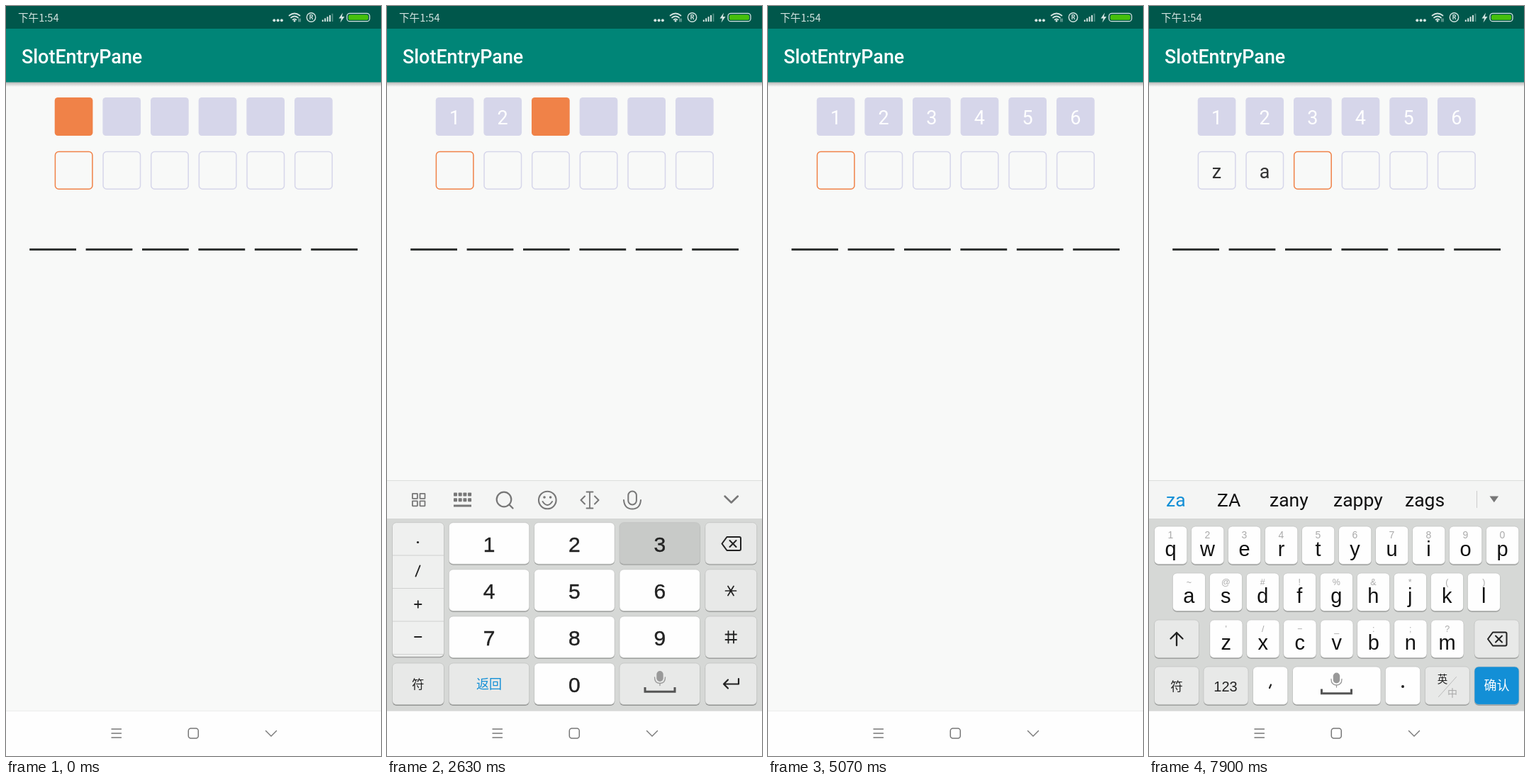
Write an HTML page that moves like this. It is 529 px wide and 1058 px high and loops after 8 s.

```html
<!DOCTYPE html>
<html lang="zh">
<head>
<meta charset="utf-8">
<style>
  html, body { margin: 0; width: 100%; height: 100%; overflow: hidden; background: #f8f9f8; }
  svg { display: block; width: 100vw; height: 100vh; }
  text { font-family: Roboto, sans-serif; }
  .key { font-family: "Liberation Sans", Arial, sans-serif; }
  .cjk { font-family: "Noto Sans CJK SC", "Noto Sans CJK", sans-serif; }
  .mid { text-anchor: middle; }
  .line { fill: none; stroke-linecap: round; stroke-linejoin: round; }
</style>
</head>
<body>
<svg id="stage" viewBox="0 0 529 1058"></svg>
<script>
const LOOP = 8000;
const ORANGE = '#f08248', LILAC = '#d6d6ea', INK = '#222', GREY = '#777', BLUE = '#138fd6';
const WHITE = '#fefefe', PALE = '#e8e9e8', PRESSED = '#c8cac8';

const rect = (x, y, w, h, fill, r = 0, more = '') =>
  `<rect x="${x}" y="${y}" width="${w}" height="${h}" rx="${r}" fill="${fill}" ${more}/>`;
const text = (s, x, y, size, fill, cls = 'mid', more = '') =>
  `<text x="${x}" y="${y}" font-size="${size}" fill="${fill}" class="${cls}" ${more}>${s}</text>`;
const line = (d, color = GREY, w = 2) =>
  `<path class="line" d="${d}" stroke="${color}" stroke-width="${w}"/>`;
const disc = (x, y, r, fill) => `<circle cx="${x}" cy="${y}" r="${r}" fill="${fill}"/>`;
const ring = (x, y, r, color, w) =>
  `<circle cx="${x}" cy="${y}" r="${r}" fill="none" stroke="${color}" stroke-width="${w}"/>`;
const group = (id, body) => `<g id="${id}">${body}</g>`;
const range = (n, f) => Array.from({ length: n }, (_, i) => f(i)).join('');

const key = (x, y, w, h, fill = WHITE, id = '') =>
  rect(x, y + 1.3, w, h, '#8e908e', 6) +
  rect(x, y, w, h, fill, 6, `stroke="#bfc1bf" stroke-width=".7" ${id && `id="${id}"`}`);

const eraser = (x, y) =>
  line(`M${x - 13} ${y}l7 -9.5h17.5q2 0 2 2v15q0 2 -2 2h-17.5z`, INK) +
  line(`M${x - 2} ${y - 4.5}l9 9m0 -9l-9 9`, INK);

const voice = (x, y) =>
  rect(x - 4.7, y - 15, 9.4, 15, '#999', 4.7) +
  line(`M${x - 7.5} ${y - 6}q0 8.5 7.5 8.5t7.5 -8.5m-7.5 8.5v3`, '#999', 1.3) +
  `<path d="M${x - 21} ${y + 8}v6.2h42v-6.2" fill="none" stroke="#555" stroke-width="3"/>`;

function statusBar() {
  const c = '#d5e4e1';
  return rect(0, 0, 529, 32, '#00574b') +
    text('下午1:54', 17, 22, 14.6, c, 'cjk') +
    range(3, i => disc(378.3 + 5.3 * i, 20.3, 2, c)) +
    line('M399.5 13.5q7.5 -6 15 0M402 16.5q5 -4 10 0M404.5 19.3q2.5 -2 5 0', c, 1.7) +
    disc(407, 21, 1.5, c) + line('M413 18v4m2 -4v4', c, .8) +
    ring(430.5, 16, 6.2, c, 1.4) +
    text('R', 430.5, 19.2, 9, c, 'mid', 'font-weight="700"') +
    range(5, i => rect(445.8 + 3.4 * i, 19.5 - 2.2 * i, 2, 2.5 + 2.2 * i, i < 4 ? c : '#4d8b81')) +
    `<path d="M475 9.5l-5.5 8h3.5l-1.5 6 6 -8.5h-3.6z" fill="${c}"/>` +
    rect(481, 10.3, 32, 11.4, 'none', 4, `stroke="${c}" stroke-width="1.3"`) +
    rect(483, 12.2, 28, 7.6, '#46c00c', 2.6);
}

function appBar() {
  return `<linearGradient id="shade" x2="0" y2="1">
      <stop stop-color="#000" stop-opacity=".28"/><stop offset="1" stop-color="#000" stop-opacity="0"/>
    </linearGradient>` +
    rect(0, 107, 529, 7, 'url(#shade)') + rect(0, 32, 529, 75.5, '#008577') +
    text('SlotEntryPane', 22, 81, 26.9, '#fff', '', 'font-weight="500"');
}

function fields() {
  return range(6, i => {
    const x = 68.7 + 67.65 * i;
    return rect(x, 129, 53.7, 54, LILAC, 4.5, `id="fill${i}"`) +
      text(i + 1, x + 26.8, 167, 27, '#fff', 'mid', `id="digit${i}"`) +
      rect(x + .7, 205.6, 52.5, 52.6, 'none', 5, `id="box${i}" stroke-width="1.5"`) +
      text('za'[i] || '', x + 26.8, 243, 27, '#333', 'mid', `id="char${i}"`) +
      rect(33.2 + 79.4 * i, 342, 65.8, 3, '#303332');
  });
}

function tools() {
  const y = 697;
  return range(4, i => rect(35.9 + 10.6 * (i % 2), 687.9 + 10.4 * (i >> 1), 7, 7, 'none', .5,
      `stroke="${GREY}" stroke-width="1.8"`)) +
    range(8, i => rect(94 + 6.7 * (i % 4), 686.5 + 7.7 * (i >> 2), 5, 5, GREY, .8)) +
    rect(94, 703.5, 25, 3, GREY) +
    ring(165, 696, 10.3, GREY, 2.2) + line('M172.5 703.5l5 5', GREY, 2.3) +
    ring(226.3, y, 12.3, GREY, 2.1) + disc(222, 693, 1.8, GREY) + disc(230.6, 693, 1.8, GREY) +
    line('M219.5 699q6.8 10 13.6 0') +
    line('M279 691.5l-5.5 5.5 5.5 5.5M293 691.5l5.5 5.5 -5.5 5.5') +
    line('M286 685.5v23M281.5 685.5h9M281.5 708.5h9', GREY, 1.8) +
    rect(340.3, 684.5, 11.6, 19, 'none', 5.8, `stroke="${GREY}" stroke-width="2"`) +
    line('M334 697q1 12.5 12 12.5t12 -12.5') +
    line('M476.5 691.5l9.2 9 9.2 -9', GREY, 2.5);
}

function candidates() {
  const xs = [24, 96, 170, 260, 361];
  return xs.map((x, i) => text('', x, 705.5, 26.5, i ? '#111' : BLUE, '', `id="word${i}"`)).join('') +
    rect(462, 684, 1, 24, '#ccc') + `<path d="M480.5 691.5h12.6l-6.3 8.7z" fill="${GREY}"/>`;
}

function numberPad() {
  const rowY = r => 728.7 + 66.1 * r, colX = c => 87.2 + 120.4 * c, W = 113.6, H = 58.6;
  const side = key(7.5, 728.7, 73, 189.3, '#eff0ef') +
    [774.5, 821, 867.5, 914].map(y => rect(8, y, 72, 1, '#d0d1d0')).join('') +
    disc(43.5, 756.5, 1.6, INK) + line('M46.5 789.5l-6 15', INK, 1.9) +
    line('M39 844h9.5m-4.75 -4.75v9.5M39 890h9.5', INK, 1.8) +
    rect(75, 735, 3, 46, '#ccc', 1.5, 'id="scrollbar"');
  const digits = range(10, i => {
    const d = (i + 1) % 10, x = colX(d ? i % 3 : 1), y = rowY(d ? Math.floor(i / 3) : 3);
    return key(x, y, W, H, WHITE, 'num' + d) + text(d, x + W / 2, y + 41.3, 30, INK, 'mid key', 'stroke="#222" stroke-width=".4"');
  });
  const right = range(4, r => key(448.8, rowY(r), 73, H, PALE));
  return side + digits + right +
    key(7.5, rowY(3), 73, H, PALE) + text('符', 43.7, 963, 17.5, INK, 'mid cjk') +
    key(colX(0), rowY(3), W, H, PALE) + text('返回', 144, 963, 18, BLUE, 'mid cjk') +
    key(colX(2), rowY(3), W, H, PALE) + voice(385, 953) +
    eraser(485.5, 758.5) +
    line('M477.5 825h15M481 818.5l8 13M489 818.5l-8 13', INK, 1.7) +
    line('M477.5 886.5h15.5M477.5 894h15.5M481.5 882v16.5M489 882v16.5', INK, 1.8) +
    line('M496 949v7.5h-21m6 -6l-6 6 6 6', INK, 2.2);
}

function letterPad() {
  const rows = [
    ['qwertyuiop', '1234567890', 7.5, 734],
    ['asdfghjkl', '~@#!%&*()', 33.3, 800],
    ['zxcvbnm', "'/−_:;?", 85.7, 866]
  ];
  const letters = rows.map(([chars, hints, x0, y]) => range(chars.length, i => {
    const x = x0 + 52 * i, hint = hints[i].replace('&', '&amp;');
    return key(x, y, 46.3, 53.4, WHITE, 'abc' + chars[i]) +
      text(hint, x + 23, y + 17, y < 800 ? 14 : 12.5, '#aaa', 'mid key') +
      text(chars[i], x + 23, y + 42, 29, '#111', 'mid key');
  })).join('');
  const wide = [[7.5, 866, 63], [459, 866, 63], [7.5, 932, 63], [77, 932, 63], [389.3, 932, 63]];
  return letters + wide.map(([x, y, w]) => key(x, y, w, 53.4, PALE)).join('') +
    key(146.5, 932, 49.3, 53.4) + key(202.5, 932, 124.5, 53.4) + key(333.3, 932, 49.5, 53.4) +
    key(459, 932, 63, 53.4, BLUE) +
    line('M39 902v-18m-8.5 8.5l8.5 -8.5 8.5 8.5', INK, 2.3) + eraser(491, 893) +
    text('符', 39, 965.5, 17.5, INK, 'mid cjk') + text('123', 108, 966.5, 20, INK, 'mid key') +
    line('M172 957.5l-2 4.5', INK, 2.2) + voice(264.5, 955.5) + disc(358, 960, 2, INK) +
    text('英', 414, 955, 14.5, INK, 'mid cjk') + text('中', 428, 973.5, 14, '#aaa', 'mid cjk') +
    line('M408.5 974.5l25 -28', '#bbb', 1) +
    text('', 490.5, 965, 18, '#fff', 'mid cjk', 'id="action"');
}

const stage = document.getElementById('stage');
stage.innerHTML =
  rect(0, 0, 529, 1058, '#f8f9f8') + appBar() + statusBar() + fields() +
  rect(0, 994, 529, 64, WHITE) +
  group('keyboard',
    rect(0, 669, 529, 54, '#f4f5f4') + rect(0, 669, 529, 1, '#dcdedc') +
    rect(0, 723, 529, 271.5, '#d6d8d6') + rect(0, 994.5, 529, 64, WHITE) +
    group('tools', tools()) + group('candidates', candidates()) +
    group('numbers', numberPad()) + group('letters', letterPad())) +
  rect(0, 994, 529, 1, 'rgba(0,0,0,.07)') +
  line('M149 1020h13.5m-13.5 6h13.5m-13.5 6h13.5', GREY, 1.4) +
  rect(257.3, 1019, 14, 14, 'none', 3.5, `stroke="${GREY}" stroke-width="1.5"`) +
  group('down', line('M366.5 1022.5l7.5 7.5 7.5 -7.5', GREY, 1.4)) +
  group('back', line('M379.5 1018.7l-7.3 7.3 7.3 7.3', GREY, 1.4));

const parts = {};
stage.querySelectorAll('[id]').forEach(e => parts[e.id] = e);
const show = (id, on) => parts[id].style.display = on ? '' : 'none';
const paint = (id, attr, value) => parts[id].setAttribute(attr, value);
const write = (id, s) => { if (parts[id].textContent !== s) parts[id].textContent = s; };
const last = (steps, t) => steps.filter(s => s[0] <= t).pop()[1];

// key, pressed from, released and entered at
const taps = [
  ['num1', 1720, 1820], ['num2', 2330, 2430], ['num3', 2630, 2740],
  ['num4', 2940, 3040], ['num5', 3240, 3340], ['num6', 3550, 3650],
  ['abcz', 7400, 7500], ['abca', 7700, 7800]
];
// keyboard drop in pixels, null while hidden
const drops = [
  [0, null], [100, 0], [3950, 30.5], [4050, 150], [4150, null],
  [5270, 180], [5370, 50], [5470, 8], [5570, 0]
];
const words = [[], ['z', 'Z', 'zip', 'zone', 'zero'], ['za', 'ZA', 'zany', 'zappy', 'zags']];

function draw(t) {
  const entered = taps.filter(tap => t >= tap[2]).length;
  const digits = Math.min(entered, 6), chars = entered - digits;
  for (let i = 0; i < 6; i++) {
    paint('fill' + i, 'fill', i === digits ? ORANGE : LILAC);
    paint('box' + i, 'stroke', i === chars ? ORANGE : LILAC);
    show('digit' + i, i < digits);
    show('char' + i, i < chars);
  }
  for (const [id, from, to] of taps) paint(id, 'fill', t >= from && t < to ? PRESSED : WHITE);

  const drop = last(drops, t);
  show('keyboard', drop !== null);
  paint('keyboard', 'transform', `translate(0 ${drop || 0})`);
  show('numbers', t < 5000);
  show('letters', t >= 5000);
  show('scrollbar', t < 1320);
  show('tools', !chars);
  show('candidates', chars > 0);
  for (let i = 0; i < 5; i++) write('word' + i, words[chars][i] || '');
  write('action', chars ? '确认' : '下一项');
  paint('action', 'font-size', chars ? 18 : 15.5);

  const back = t >= 3850 && t < 5070;
  show('back', back);
  show('down', !back);
}

function tick() {
  draw(performance.now() % LOOP);
  requestAnimationFrame(tick);
}
tick();
</script>
</body>
</html>
```
